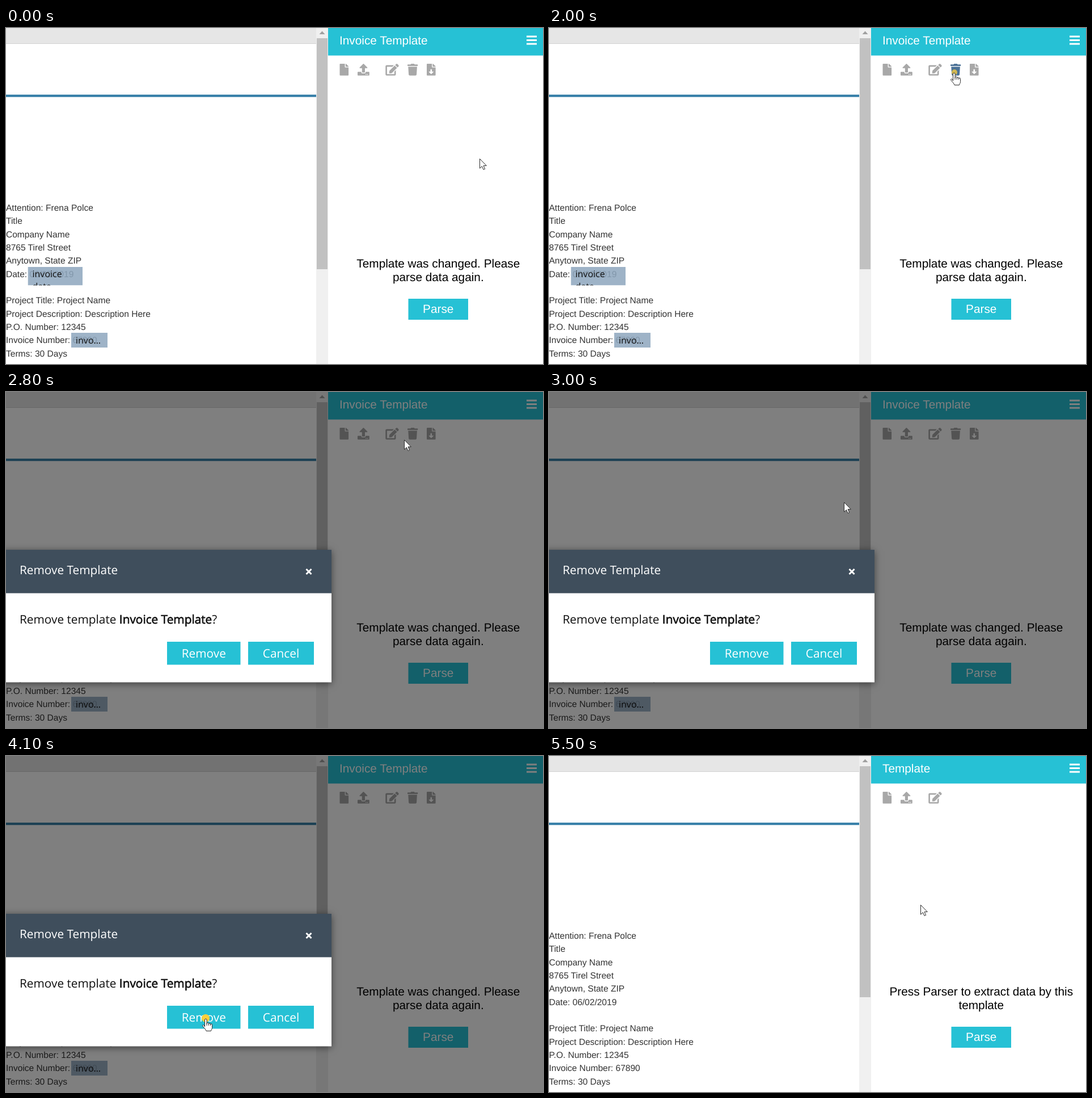
Recreate the animation shown at these times as an HTML page with a canvas. Size 947 by 592 pixels, loop 6900 ms.

```html
<!DOCTYPE html>
<html lang="en">
<head>
<meta charset="utf-8">
<title>Remove template</title>
<style>
  html, body { margin: 0; width: 100%; height: 100%; overflow: hidden; background: #fff; }
  canvas { display: block; }
</style>
</head>
<body>
<canvas id="stage" width="947" height="592"></canvas>
<script>
const ctx = document.getElementById('stage').getContext('2d');
ctx.textRendering = 'geometricPrecision';
const LOOP = 6900, TICK = 100;
const CYAN = '#26c1d5', ICON = '#a8a8a8', HOVER = '#4b7196';
const ARIAL = '"Liberation Sans", Arial, sans-serif';
const OPEN = '"Open Sans", sans-serif';

const DIALOG_OPEN = 2100, DIALOG_CLOSE = 4200;

// Pointer stops: [time, x, y, eased]
const STOPS = [
  [0, 835, 230], [600, 835, 230], [1300, 714, 84, true], [1500, 714, 79],
  [2700, 714, 79], [2800, 702, 84], [3000, 520, 194], [3200, 407, 341],
  [3400, 350, 453], [3600, 352, 463], [4900, 352, 463],
  [5500, 655, 262, true], [LOOP, 655, 262]
];

// Click dots: [from, to, x, y, radius, alpha]
const CLICKS = [
  [1900, 2000, 715, 78, 7, 1], [2000, 2100, 715, 78, 5, .75],
  [4100, 4300, 352, 462, 7, 1], [4300, 4400, 352, 462, 5, .75]
];

// Icons on a 512 unit high grid
const SHEET = 'M224 0V136Q224 160 248 160H384V488Q384 512 360 512H24Q0 512 0 488V24Q0 0 24 0Z' +
  'M256 0H262Q272 0 279 7L377 105Q384 112 384 122V128H256Z';
const icons = {
  file: new Path2D(SHEET),
  upload: new Path2D('M216 384Q192 384 192 360V192H104C86 192 78 170 90 158L242 6Q256-6 270 6L422 158C434 170 426 192 408 192H320V360Q320 384 296 384Z' +
    'M24 352H160V360Q160 416 216 416H296Q352 416 352 360V352H488Q512 352 512 376V488Q512 512 488 512H24Q0 512 0 488V376Q0 352 24 352Z' +
    'M348 464a20 20 0 1 0 40 0a20 20 0 1 0-40 0ZM412 464a20 20 0 1 0 40 0a20 20 0 1 0-40 0Z'),
  edit: new Path2D('M396 77L500 180L274 406L182 416Q158 416 160 394L170 302Z' +
    'M418 54L461 11Q488-10 516 11L565 60Q586 88 565 115L522 158Z' +
    'M384 340V448H64V128H298L362 64H48Q0 64 0 112V464Q0 512 48 512H400Q448 512 448 464V276Z'),
  trash: new Path2D('M16 32H136L145 13Q152 0 167 0H281Q296 0 303 13L312 32H432Q448 32 448 48V80Q448 96 432 96H16Q0 96 0 80V48Q0 32 16 32Z' +
    'M32 128H416L395 467Q391 512 347 512H101Q57 512 53 467Z'),
  download: new Path2D(SHEET + 'M160 240H224V336H282Q308 338 292 356L202 446Q192 454 182 446L92 356Q76 338 102 336H160Z')
};

const arrowShape = new Path2D('M.5 .5V17.2L4.4 13.6L7 19.5L9.6 18.4L7.1 12.6H12.3Z');
const handShape = new Path2D('M-1.5 14V2a1.8 1.8 0 0 1 3.6 0V8.5a1.65 1.65 0 0 1 3.3 0V9.5a1.6 1.6 0 0 1 3.2 0V10.5a1.5 1.5 0 0 1 3 0V15.5C11.6 18 10 19 9.5 21.5H1C.5 18.5-3 16-5.2 12.8C-6 11-4 10-2.8 11.5Z');
const handLines = new Path2D('M2.1 8V12M5.4 9V12M8.6 10V12');

function box(color, x, y, w, h) {
  ctx.fillStyle = color;
  ctx.fillRect(x, y, w, h);
}

function text(str, x, y, size, color, family = ARIAL, align = 'left') {
  ctx.font = `${size}px ${family}`;
  ctx.fillStyle = color;
  ctx.textAlign = align;
  ctx.fillText(str, x, y);
  return ctx.measureText(str).width;
}

function icon(name, x, color = ICON) {
  ctx.save();
  ctx.translate(x, 63);
  ctx.scale(20.8 / 512, 20.8 / 512);
  ctx.fillStyle = color;
  ctx.fill(icons[name], 'evenodd');
  ctx.restore();
}

function button(label, x, y, w, h, baseline, family) {
  box(CYAN, x, y, w, h);
  text(label, x + w / 2, baseline, 20.8, '#fff', family, 'center');
}

function tag(x, y, w, h, lines, baseline) {
  ctx.save();
  ctx.beginPath();
  ctx.rect(x, y, w, h);
  ctx.clip();
  box('rgba(143,167,190,.86)', x, y, w, h);
  lines.forEach((line, i) => text(line, x + 8, baseline + i * 22, 16, '#111', OPEN));
  ctx.restore();
}

function drawDocument(tagged) {
  box('#e6e6e6', 0, 0, 547, 27);
  box('#d2d2d2', 0, 27, 547, 1);
  // Rule with soft edges
  box('rgba(49,124,166,.55)', 0, 117, 547, 5);
  box('#317ca6', 0, 118, 547, 3);
  const lines = [
    'Attention: Frena Polce', 'Title', 'Company Name', '8765 Tirel Street',
    'Anytown, State ZIP', 'Date: 06/02/2019', '',
    'Project Title: Project Name', 'Project Description: Description Here',
    'P.O. Number: 12345', 'Invoice Number: 67890', 'Terms: 30 Days'
  ];
  lines.forEach((line, i) => text(line, 0, 322 + i * 23.33, 15.55, '#333'));
  if (tagged) {
    tag(38.5, 421, 96.5, 32.5, ['invoice', 'date'], 439);
    tag(115, 537, 64, 26, ['invo…'], 555.5);
  }
}

function drawScrollbar() {
  box('#f0f0f0', 547, 0, 21, 592);
  box('#c1c1c1', 548, 18, 19, 407);
  ctx.fillStyle = '#a0a0a0';
  ctx.fill(new Path2D('M552.5 11L557.5 5.5L562.5 11Z'));
}

function drawPanel(removed, hover) {
  box(CYAN, 568, 0, 379, 48.5);
  text(removed ? 'Template' : 'Invoice Template', 588, 29, 20.8, '#fff');
  for (let i = 0; i < 3; i++) box('#fff', 918, 13.5 + i * 6.5, 18, 3);

  icon('file', 588.5);
  icon('upload', 620);
  icon('edit', 669.3);
  if (!removed) {
    icon('trash', 708, hover ? HOVER : ICON);
    icon('download', 742);
  }

  const message = removed
    ? ['Press Parser to extract data by this', 'template']
    : ['Template was changed. Please', 'parse data again.'];
  message.forEach((line, i) => text(line, 762.3, 422 + i * 24, 20.8, '#000', ARIAL, 'center'));
  button('Parse', 709.5, 477, 105.5, 37, 502, ARIAL);
}

function drawDialog() {
  box('rgba(0,0,0,.5)', 0, 0, 947, 592);
  ctx.save();
  ctx.shadowColor = 'rgba(0,0,0,.5)';
  ctx.shadowBlur = 12;
  ctx.shadowOffsetY = 2;
  box('#fff', -20, 278, 594, 233.5);
  ctx.restore();
  box('#3f4e5c', 0, 278, 574, 76.5);
  text('Remove Template', 24, 320.5, 20.8, '#fff', OPEN);

  ctx.strokeStyle = '#fff';
  ctx.lineWidth = 3;
  ctx.stroke(new Path2D('M529.5 312L538.5 321M538.5 312L529.5 321'));

  let x = 24;
  x += text('Remove template ', x, 407.5, 20.8, '#111', OPEN);
  const name = 'Invoice Template';
  const w = text(name, x, 407.5, 20.8, '#111', OPEN);
  ctx.strokeStyle = '#111';
  ctx.lineWidth = .7;
  ctx.strokeText(name, x, 407.5);
  text('?', x + w, 407.5, 20.8, '#111', OPEN);

  button('Remove', 284, 440, 129.5, 40.5, 467.5, OPEN);
  button('Cancel', 427, 440, 116, 40.5, 467.5, OPEN);
}

function pointerAt(t) {
  const i = STOPS.findIndex(s => s[0] > t);
  const [t0, x0, y0] = STOPS[i - 1];
  const [t1, x1, y1, eased] = STOPS[i];
  let p = (t - t0) / (t1 - t0);
  if (eased) p = p * p * (3 - 2 * p);
  return [Math.round(x0 + (x1 - x0) * p), Math.round(y0 + (y1 - y0) * p)];
}

function drawPointer(t, hand) {
  const shape = hand ? handShape : arrowShape;
  ctx.save();
  ctx.translate(...pointerAt(t));
  ctx.fillStyle = '#fff';
  ctx.strokeStyle = '#2a2a2a';
  ctx.lineWidth = 1;
  ctx.lineJoin = 'round';
  ctx.fill(shape);
  ctx.stroke(shape);
  if (hand) ctx.stroke(handLines);
  ctx.restore();
}

function drawClicks(t) {
  for (const [from, to, x, y, r, alpha] of CLICKS) {
    if (t < from || t >= to) continue;
    ctx.globalAlpha = alpha;
    ctx.fillStyle = '#fdd03b';
    ctx.beginPath();
    ctx.arc(x, y, r, 0, 7);
    ctx.fill();
    ctx.globalAlpha = 1;
  }
}

function draw(t) {
  const removed = t >= DIALOG_CLOSE;
  const onTrash = t >= 1300 && t < DIALOG_OPEN;
  const onRemove = t >= 3400 && t < DIALOG_CLOSE;
  box('#fff', 0, 0, 947, 592);
  drawDocument(!removed);
  drawScrollbar();
  drawPanel(removed, onTrash);
  if (t >= DIALOG_OPEN && !removed) drawDialog();
  drawClicks(t);
  drawPointer(t, onTrash || onRemove);
}

const start = performance.now();
function frame() {
  const t = (performance.now() - start) % LOOP;
  draw(Math.floor(t / TICK) * TICK);
  requestAnimationFrame(frame);
}
frame();
</script>
</body>
</html>
```
